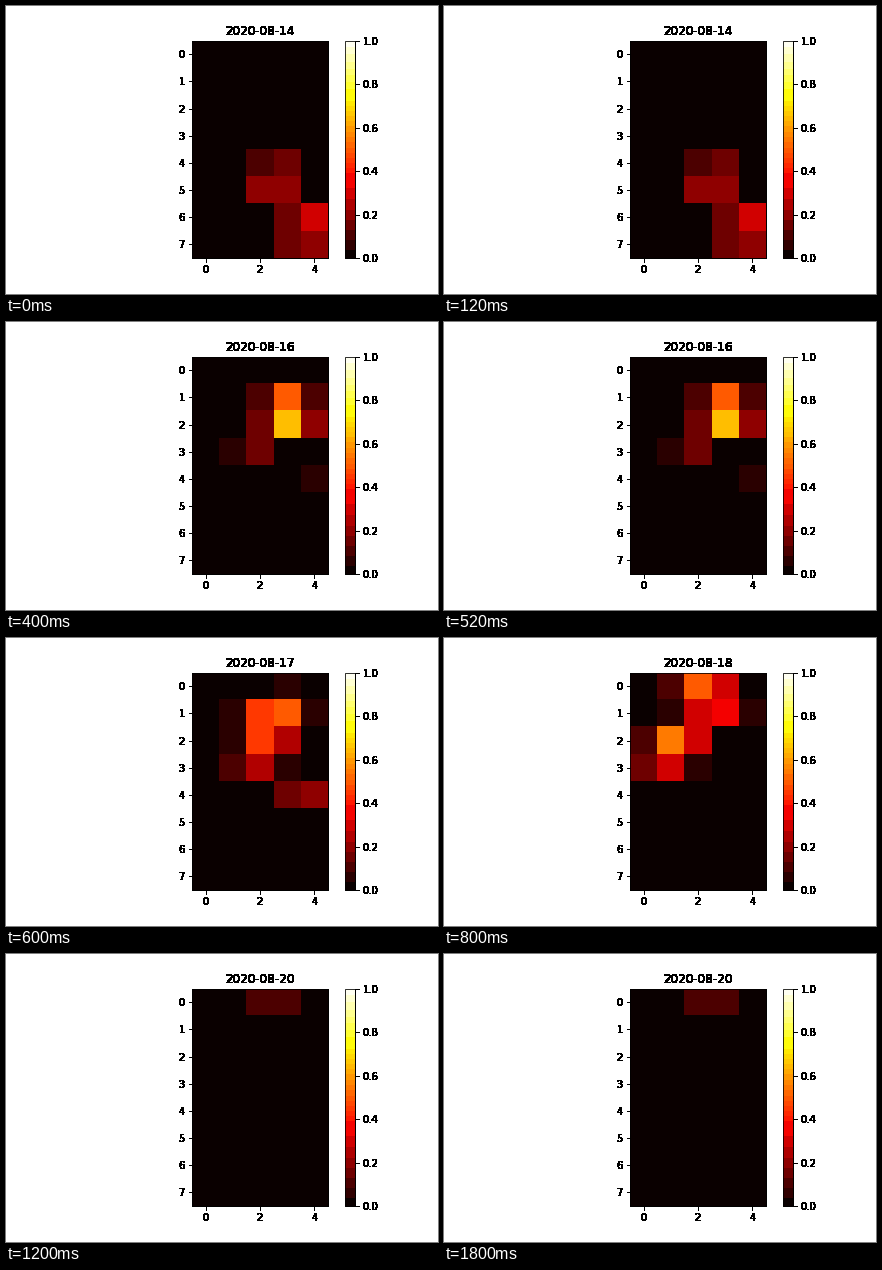
A matplotlib script that plays this animation: 432x288 px, repeating every 2.2 s.

```python
import numpy as np
import matplotlib.pyplot as plt
from matplotlib.animation import FuncAnimation
from matplotlib.colors import ListedColormap

ROWS, COLS = 8, 5
STEP_MS, STEPS = 200, 11
LEVEL = 5  # heat comes in steps of five percent

# per day: first row, spread, then one (column, heat) key point per row
DAYS = [
    (4, 0.85, [(2.55, 17), (2.5, 28), (3.7, 34), (3.55, 26)]),
    (4, 1.25, [(2.1, 50), (2.42, 53)]),
    (1, 0.85, [(3, 48), (3.05, 65), (1.8, 18), (4.3, 5)]),
    (0, 0.85, [(3, 5), (2.52, 68), (2.3, 49), (1.85, 27), (3.55, 26)]),
    (0, 0.95, [(2.25, 54), (2.55, 43), (1.2, 57), (0.85, 30)]),
    (0, 0.85, [(2.55, 26), (2.35, 29), (1, 26)]),
    (0, 0.85, [(2.5, 14)]),
]

HOT = (plt.get_cmap("hot")(np.arange(256))[:, :3] * 255).astype(int)
BUCKET = (HOT[:, 0] >> 5) * 128 + (HOT[:, 1] >> 4) * 8 + (HOT[:, 2] >> 5)


def day_grid(first, spread, trail):
    """Bell-shaped heat around the key point of each active row."""
    grid = np.zeros((ROWS, COLS))
    for row, (col, heat) in enumerate(trail, first):
        bell = np.exp(-((np.arange(COLS) - col) / spread) ** 2)
        grid[row] = np.round(heat * bell / LEVEL) * LEVEL / 100
    return grid


def banded_cmap(grid):
    """Hot colormap merged into coarse bands, weighted by area on screen."""
    index = (grid.ravel() * 256).astype(int)
    weight = 9 + 735 * np.bincount(index, minlength=256)
    total = np.bincount(BUCKET, weight)
    bands = [np.bincount(BUCKET, weight * c)[BUCKET] / total[BUCKET]
             for c in HOT.T]
    return ListedColormap(np.array(bands).T / 255)


def solid_black(pixels, dpi):
    """Turn every touched pixel fully black, without soft edges."""
    out = np.zeros_like(pixels)
    out[..., 3] = pixels[..., 3] > 0
    return out, 0, 0


GRIDS = [day_grid(*day) for day in DAYS]
CMAPS = [banded_cmap(grid) for grid in GRIDS]

plt.rcParams.update({"font.family": "DejaVu Sans", "font.size": 10})
fig, ax = plt.subplots(figsize=(6, 4), dpi=72, facecolor="white")
fig.subplots_adjust(left=0.125, right=0.9, bottom=0.125, top=0.88)

image = ax.imshow(GRIDS[0], cmap=CMAPS[0], vmin=0, vmax=1,
                  interpolation="nearest")
ax.set_xticks([0, 2, 4])
ax.set_yticks(range(ROWS))
title = ax.set_title("2020-08-14", fontsize=12)
bar = fig.colorbar(image, ax=ax, ticks=np.linspace(0, 1, 6))

for part in (title, ax.xaxis, ax.yaxis, bar.ax.yaxis):
    part.set_agg_filter(solid_black)
for axes in (ax, bar.ax):
    axes.patch.set(edgecolor="black", linewidth=1)


def update(step):
    day = min(step, len(DAYS) - 1)
    image.set_data(GRIDS[day])
    image.set_cmap(CMAPS[day])
    title.set_text(f"2020-08-{14 + day}")
    return image, title


anim = FuncAnimation(fig, update, frames=STEPS, interval=STEP_MS,
                     repeat=True, repeat_delay=0, blit=False)
plt.show()
```
